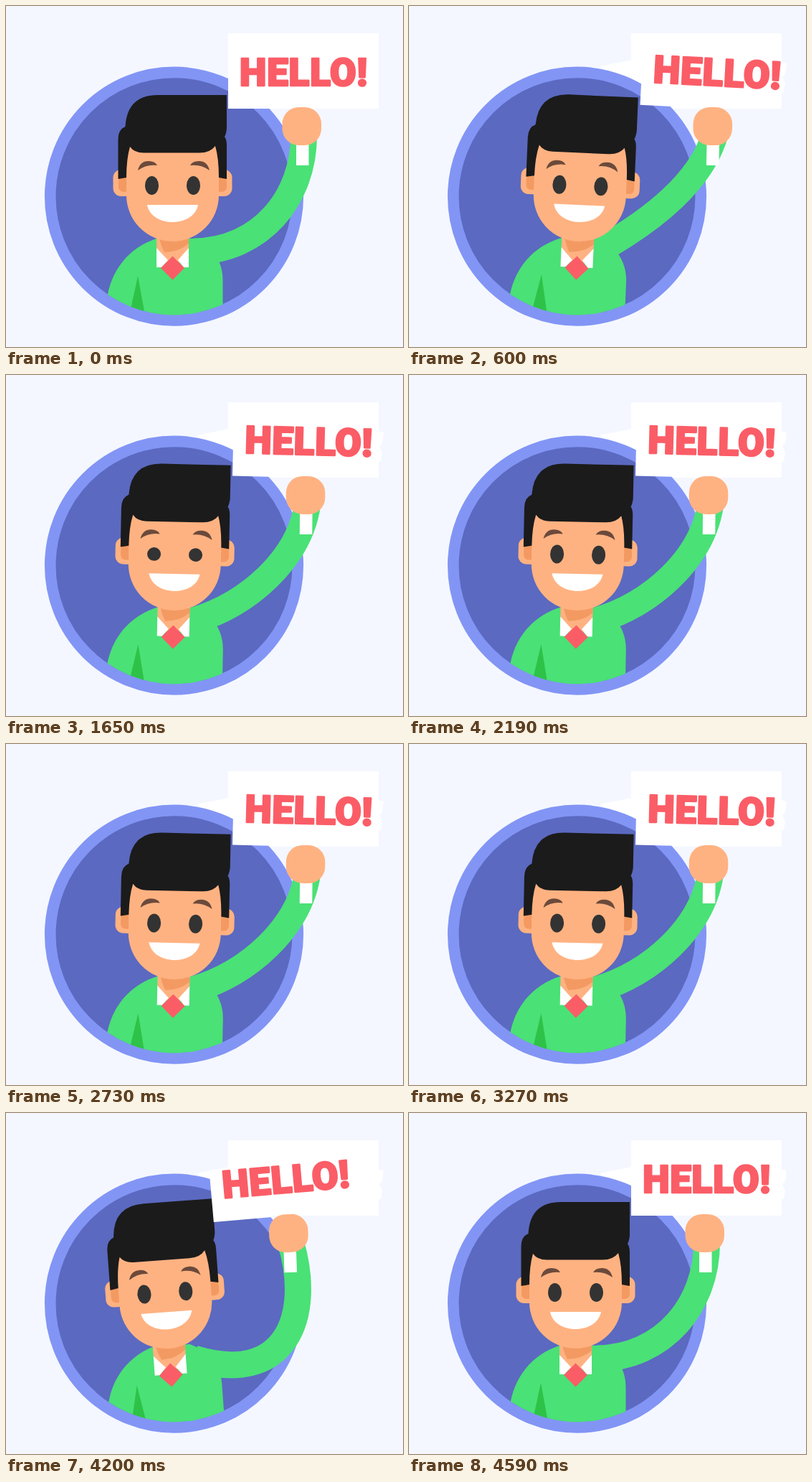
An HTML page for the animation above (4920 ms loop, 554 by 475 pixels).

```html
<!DOCTYPE html>
<html lang="en">
<head>
<meta charset="utf-8">
<title>Hello</title>
<style>
html, body { margin: 0; height: 100%; overflow: hidden; background: #f4f7ff; }
svg { display: block; width: 554px; height: 475px; }
text { font: 900 53px Roboto, sans-serif; letter-spacing: 0.8px; text-anchor: middle;
  fill: #fb5d67; stroke: #fb5d67; stroke-width: 2.6; stroke-linejoin: round; }
</style>
</head>
<body>
<svg viewBox="0 0 554 475">
  <defs>
    <clipPath id="disc"><circle cx="234.5" cy="265.2" r="182"/></clipPath>
    <clipPath id="inside"><circle cx="234.5" cy="265.2" r="165.2"/></clipPath>
    <path id="brow" d="M184 229Q187 216 199 216Q208 216 211 222Q196 220 184 229Z" fill="#6b4a3b"/>
    <g id="ear">
      <rect x="149.500" y="228" width="30" height="37" rx="11" fill="#ffb281"/>
      <rect x="157" y="238" width="20" height="21" rx="7" fill="#f39a62"/>
    </g>
  </defs>

  <g fill="#fff">
    <path d="M310 38H520V143H310Z"/>
    <path id="leftTrail" d="M266 84L311 75V110Z"/>
    <path id="rightTrail" d="M519 78L527 80L525 95L521 99L525 108L523 119L519 121Z"/>
  </g>
  <circle cx="234.5" cy="265.2" r="172.8" fill="#5b69c0" stroke="#8295f5" stroke-width="15.6"/>

  <g clip-path="url(#inside)">
    <g class="lean">
      <path d="M130 470L141 408C146 370 170 337 210 324H262L283 335Q302.500 355 302.500 382V470Z" fill="#4ae176"/>
      <path d="M184 376L195 436H171Z" fill="#2ec248"/>
    </g>
  </g>
  <path id="arm" fill="none" stroke="#4ae176" stroke-width="37"/>

  <g class="lean">
    <path d="M210 315H255V337L240 360H225L210 337Z" fill="#ffb281"/>
    <path d="M214 324H255V331Q241 343 221 343Q216 334 214 324Z" fill="#f39a62"/>
    <path d="M210 337L226 354L217 364H210ZM255 337L240 354L248 364H255Z" fill="#fff"/>
    <path d="M232.500 348.500L249 365L232.500 381.500L216 365Z" fill="#fb5d67"/>
    <use href="#ear"/>
    <use href="#ear" transform="matrix(-1 0 0 1 465 0)"/>
    <path d="M168 190H297V263.500A64.500 64.500 0 0 1 168 263.500Z" fill="#ffb281"/>
    <path d="M156.500 241V186Q156.500 172 166.500 168Q169 124 212 124H308V171Q307 179 305 182Q308 186 308 194V241L297 239Q297 212 292 195Q285 204.500 270 204.500H192Q179 204.500 173 196Q168 213 168 239Z" fill="#1b1b1b"/>
    <use href="#brow"/>
    <use href="#brow" transform="matrix(-1 0 0 1 468 0)"/>
    <g fill="#333">
      <ellipse class="eye" cx="203.500" cy="250" rx="9.500"/>
      <ellipse class="eye" cx="261.500" cy="250" rx="9.500"/>
    </g>
    <path d="M197 277H268C262 309 203 309 197 277Z" fill="#fff"/>
  </g>

  <g clip-path="url(#disc)">
    <path class="sign" d="M310 38H520V143H310Z" fill="#fff"/>
  </g>
  <g class="sign"><text x="415.500" y="111">HELLO!</text></g>
  <g id="hand">
    <path d="M405 185H422.500V222H405Z" fill="#fff"/>
    <rect x="385.500" y="141" width="54.500" height="53" rx="23" fill="#ffb281"/>
  </g>
</svg>
<script>
const LOOP = 4920, PERIOD = 540, CENTRE = 546, STOP = 4590;
const FIRST_LEFT = CENTRE - PERIOD / 4;
const $ = id => document.getElementById(id);
const setAll = (selector, name, value) =>
  document.querySelectorAll(selector).forEach(el => el.setAttribute(name, value));

// -1 is the far left of the wave, 1 the far right
function sway(t) {
  if (t >= STOP) return 0;
  if (t < FIRST_LEFT) return (Math.cos(Math.PI * t / FIRST_LEFT) - 1) / 2;
  return Math.sin(2 * Math.PI * (t - CENTRE) / PERIOD);
}

function eyeOpen(t) {
  const fromClosed = Math.min(Math.abs(t - 1740), Math.abs(t - 3900));
  return Math.min(1, 0.1 + 0.9 * Math.max(0, fromClosed - 20) / 100);
}

function draw(now) {
  const t = now % LOOP, s = sway(t), reach = 18.5 * s, bend = Math.tanh(2 * s);
  setAll('.lean', 'transform', `translate(${1.2 * s}) rotate(${4.2 * s} 233 380)`);
  setAll('.sign', 'transform', `translate(${reach}) rotate(${5 * s} 413 168)`);
  setAll('.eye', 'ry', 13 * eyeOpen(t));
  $('hand').setAttribute('transform', `translate(${reach}) rotate(${2 * s} 413 168)`);
  $('arm').setAttribute('d', `M${415.5 + reach} 180C${416 - 13 * bend} ${266 - 18 * bend} ` +
    `${356 - 35 * bend} ${341 - 42 * bend} 262 342`);
  $('leftTrail').style.opacity = +(t > 300);
  $('rightTrail').style.opacity = +(t > 600);
  requestAnimationFrame(draw);
}
draw(0);
</script>
</body>
</html>
```
